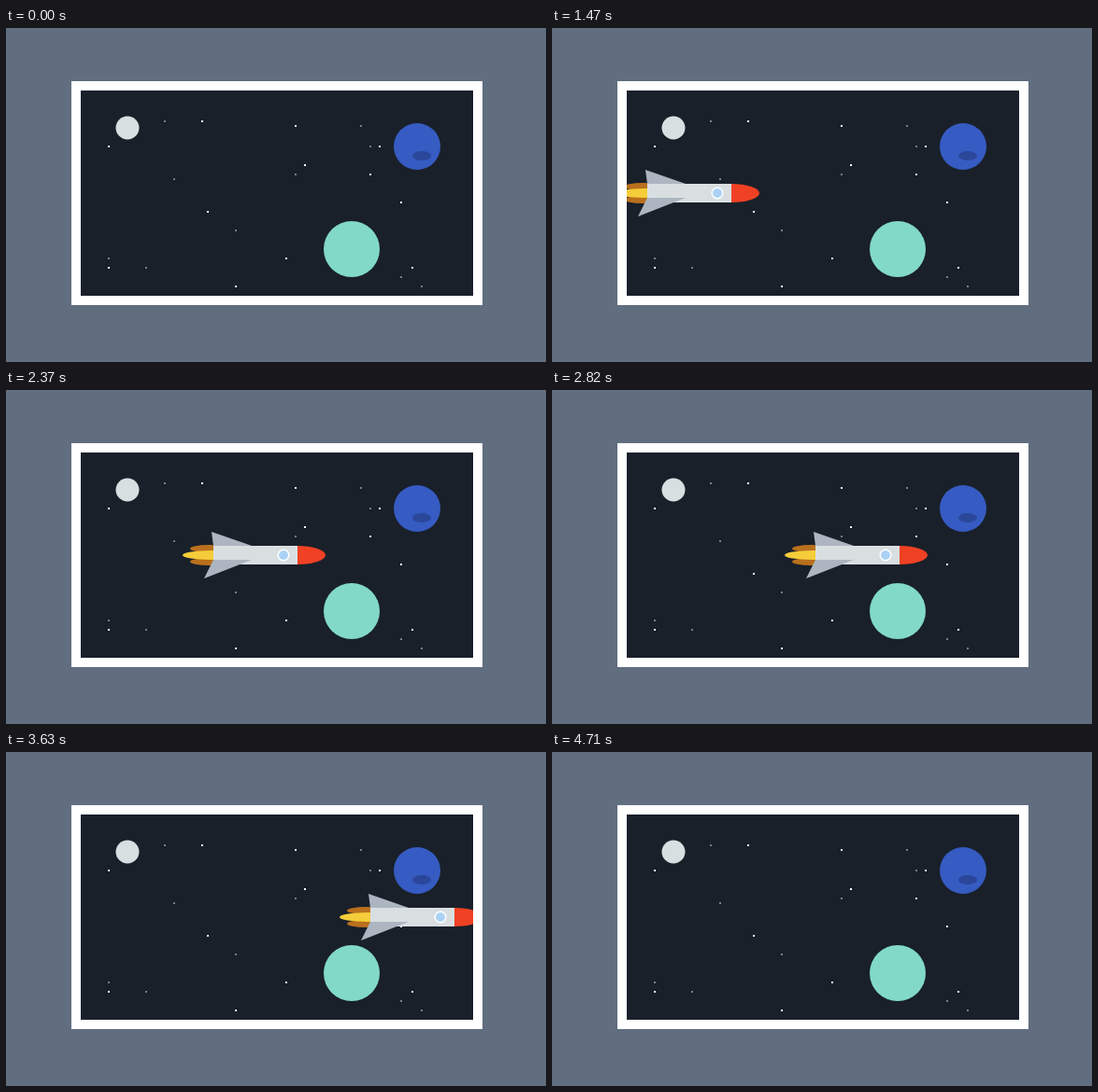
Write an HTML page that moves like this. It is 578 px wide and 358 px high and loops after 5.52 s.

```html
<!DOCTYPE html>
<html lang="en">
<head>
<meta charset="utf-8">
<title>Rocket</title>
<style>
  html, body { margin: 0; width: 100%; height: 100%; overflow: hidden; background: #616e7f; }
  svg { display: block; }
</style>
</head>
<body>
<svg width="578" height="358" viewBox="0 0 578 358">
  <clipPath id="sky"><rect x="80" y="67" width="420" height="220"/></clipPath>
  <rect width="578" height="358" fill="#616e7f"/>
  <rect x="70" y="57" width="440" height="240" fill="#fff"/>
  <rect x="80" y="67" width="420" height="220" fill="#19202a"/>
  <g id="stars" fill="#fff"></g>
  <circle cx="130" cy="107" r="12.5" fill="#d8dfe0"/>
  <circle cx="440" cy="127" r="25" fill="#365bc2"/>
  <ellipse cx="445" cy="137" rx="10" ry="5" fill="#2a479a"/>
  <circle cx="370" cy="237" r="30" fill="#82d9c8"/>
  <g clip-path="url(#sky)">
    <!-- the nose tip sits at x = 0 -->
    <g id="rocket" visibility="hidden">
      <g fill="#b9701d">
        <ellipse cx="-125" cy="170" rx="20" ry="4"/>
        <ellipse cx="-125" cy="184" rx="20" ry="4"/>
      </g>
      <ellipse cx="-123" cy="177" rx="30" ry="5" fill="#f5cd3a"/>
      <rect x="-120" y="167" width="90" height="20" fill="#d9dfe1"/>
      <path d="M-30 167A30 10 0 0 1-30 187Z" fill="#f04124"/>
      <path d="M-122 152L-79 167H-120ZM-130 202L-120 182H-79Z" fill="#adb6c0"/>
      <circle cx="-45" cy="177" r="5.75" fill="#abd2f5" stroke="#fff" stroke-width="1.5"/>
    </g>
  </g>
</svg>
<script>
  const LOOP = 5520, STEP = 30, START = 480, END = 4710;
  const bright = [[210,100],[310,105],[110,127],[400,127],[320,147],[390,157],
    [423,187],[216,197],[300,247],[110,257],[435,257],[246,277]];
  const faint = [[170,100],[380,105],[390,127],[310,157],[180,162],[246,217],
    [110,247],[150,257],[423,267],[445,277]];
  const rocket = document.getElementById('rocket');

  const dots = (list, size, opacity) => list.map(([x, y]) =>
    `<rect x="${x - size / 2}" y="${y - size / 2}" width="${size}" height="${size}" opacity="${opacity}"/>`).join('');
  document.getElementById('stars').innerHTML = dots(bright, 2, 1) + dots(faint, 1.5, 0.75);

  // 4 px per step, shown only during the flight
  function draw(now) {
    const t = Math.floor((now % LOOP) / STEP) * STEP;
    const x = 90 + (t - START) / STEP * 4;
    rocket.setAttribute('visibility', t >= START && t < END ? 'visible' : 'hidden');
    rocket.setAttribute('transform', `translate(${x} 0)`);
  }

  const begin = performance.now();
  function tick() {
    draw(performance.now() - begin);
    requestAnimationFrame(tick);
  }
  tick();
</script>
</body>
</html>
```
